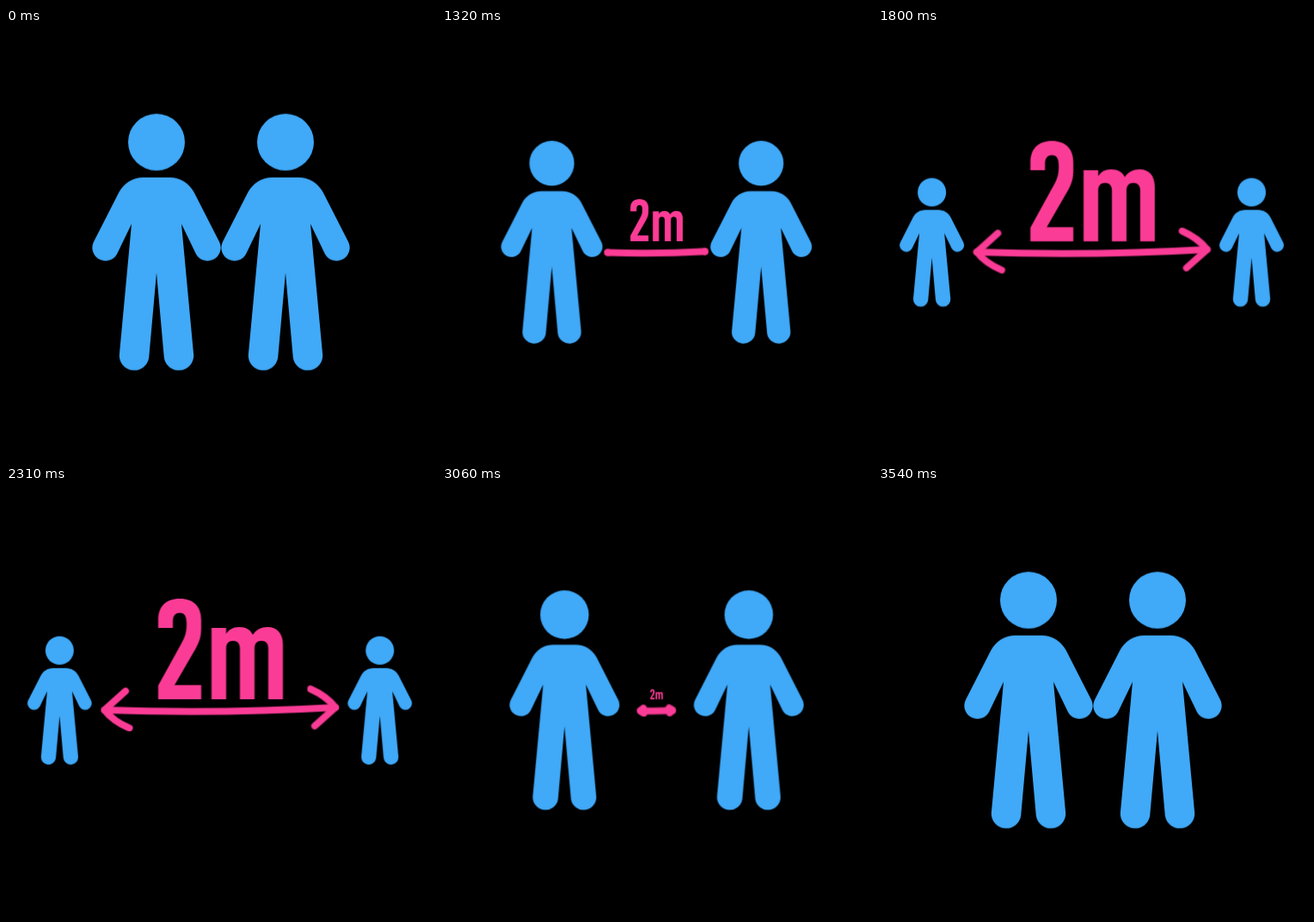
An HTML page without scripts for the animation above (3660 ms loop, 500 by 500 pixels).

```html
<!DOCTYPE html>
<html lang="en">
<head>
<meta charset="utf-8">
<title>Keep 2m apart</title>
<style>
  html, body { margin: 0; height: 100%; overflow: hidden; background: #000; }
  svg { display: block; width: 100vw; height: 100vh; }

  .person, .arrow, .label, .tip { animation: 3660ms linear infinite; }
  .person { fill: #40a9f8; }
  .left { animation-name: left; }
  .right { animation-name: right; }

  .label { fill: #fb3c96; animation-name: label; }
  .arrow {
    fill: none;
    stroke: #fb3c96;
    stroke-width: 8;
    stroke-linecap: round;
    stroke-linejoin: round;
    animation-name: arrow, show;
    animation-timing-function: linear, step-end;
  }
  .arrow path { vector-effect: non-scaling-stroke; }
  .tip { animation-name: tip; }

  /* Easings are written out: var() is not resolved inside keyframes */
  @keyframes left {
    0%, 25.409% { transform: translate(175px, 249.7px) scale(1); animation-timing-function: cubic-bezier(.59, 0, .27, 1); }
    50.82%, 74.235% { transform: translate(62.3px, 249.7px) scale(.5); animation-timing-function: cubic-bezier(.45, 0, .15, 1); }
    95.383%, 100% { transform: translate(175px, 249.7px) scale(1); }
  }
  @keyframes right {
    0%, 25.409% { transform: translate(325px, 249.7px) scale(1); animation-timing-function: cubic-bezier(.59, 0, .27, 1); }
    50.82%, 74.235% { transform: translate(434.7px, 249.7px) scale(.5); animation-timing-function: cubic-bezier(.45, 0, .15, 1); }
    95.383%, 100% { transform: translate(325px, 249.7px) scale(1); }
  }
  @keyframes label {
    0%, 25.409% { transform: scale(0); animation-timing-function: cubic-bezier(.59, 0, .27, 1); }
    50.82%, 73.497% { transform: scale(1); animation-timing-function: cubic-bezier(.45, 0, .15, 1); }
    89.891%, 100% { transform: scale(0); }
  }
  @keyframes arrow {
    0%, 25.409% { transform: scale(.003); animation-timing-function: cubic-bezier(.59, 0, .27, 1); }
    50.82%, 73.443% { transform: scale(1); animation-timing-function: cubic-bezier(.45, 0, .15, 1); }
    91.311%, 100% { transform: scale(.003); }
  }
  @keyframes show {
    0% { opacity: 0; }
    25.409% { opacity: 1; }
    96.72%, 100% { opacity: 0; }
  }
  /* Arrowheads open once the line is nearly drawn */
  @keyframes tip {
    0%, 40.984% { transform: scale(.01); animation-timing-function: ease-in-out; }
    48.361%, 96.72% { transform: scale(1); }
    100% { transform: scale(.01); }
  }
</style>
</head>
<body>
<svg viewBox="0 0 500 500" role="img" aria-label="Two people moving 2m apart">
  <defs>
    <g id="body">
      <circle cy="-117" r="33"/>
      <path d="M-15 -76 H15 C28 -76 38 -69 43.5 -59 L73.1 -1
        A15.3 15.3 0 0 1 45.9 13 L29 -22 L43.2 130.4
        A17.3 17.3 0 0 1 8.8 133.6 L0 35 L-8.8 133.6
        A17.3 17.3 0 0 1 -43.2 130.4 L-29 -22 L-45.9 13
        A15.3 15.3 0 0 1 -73.1 -1 L-43.5 -59 C-38 -69 -28 -76 -15 -76 Z"/>
    </g>
  </defs>

  <g class="person left"><use href="#body"/></g>
  <g class="person right"><use href="#body"/></g>

  <g transform="translate(249.5 261.5)">
    <g class="arrow">
      <path d="M-135 -1 Q0 3.5 133.5 -4"/>
      <g transform="translate(-135 -1)">
        <g class="tip"><path d="M24.5 -22 L0 0 Q10 13 29 21"/></g>
      </g>
      <g transform="translate(133.5 -4)">
        <g class="tip"><path d="M-29 -21.5 Q-10 -13 0 0 L-24 21.5"/></g>
      </g>
    </g>
  </g>

  <!-- Condensed lettering: 2m -->
  <g transform="translate(249.5 248)">
    <g class="label" role="img" aria-label="2m">
      <g transform="translate(-249.5 -248)">
        <path d="M177 165 V156 C177 140 186 131 202 131 S227 140 227 156 V165
          C227 175 225 181 220 190 L196 231.5 H227 V248 H177 V232 L204 183
          C209 174 210 169 210 160 C210 152 208 147.5 202 147.5 S194 152 194 158 V165 Z"/>
        <path d="M239 248 V165 H256 V172 C259 167 264 164 271 164 C279 164 284 167 287 173
          C291 167 297 164 304 164 C316 164 322 172 322 185 V248 H305 V189
          C305 183 302 180 297 180 S289 183 289 189 V248 H272 V189
          C272 183 269 180 264 180 S256 183 256 189 V248 Z"/>
      </g>
    </g>
  </g>
</svg>
</body>
</html>
```
